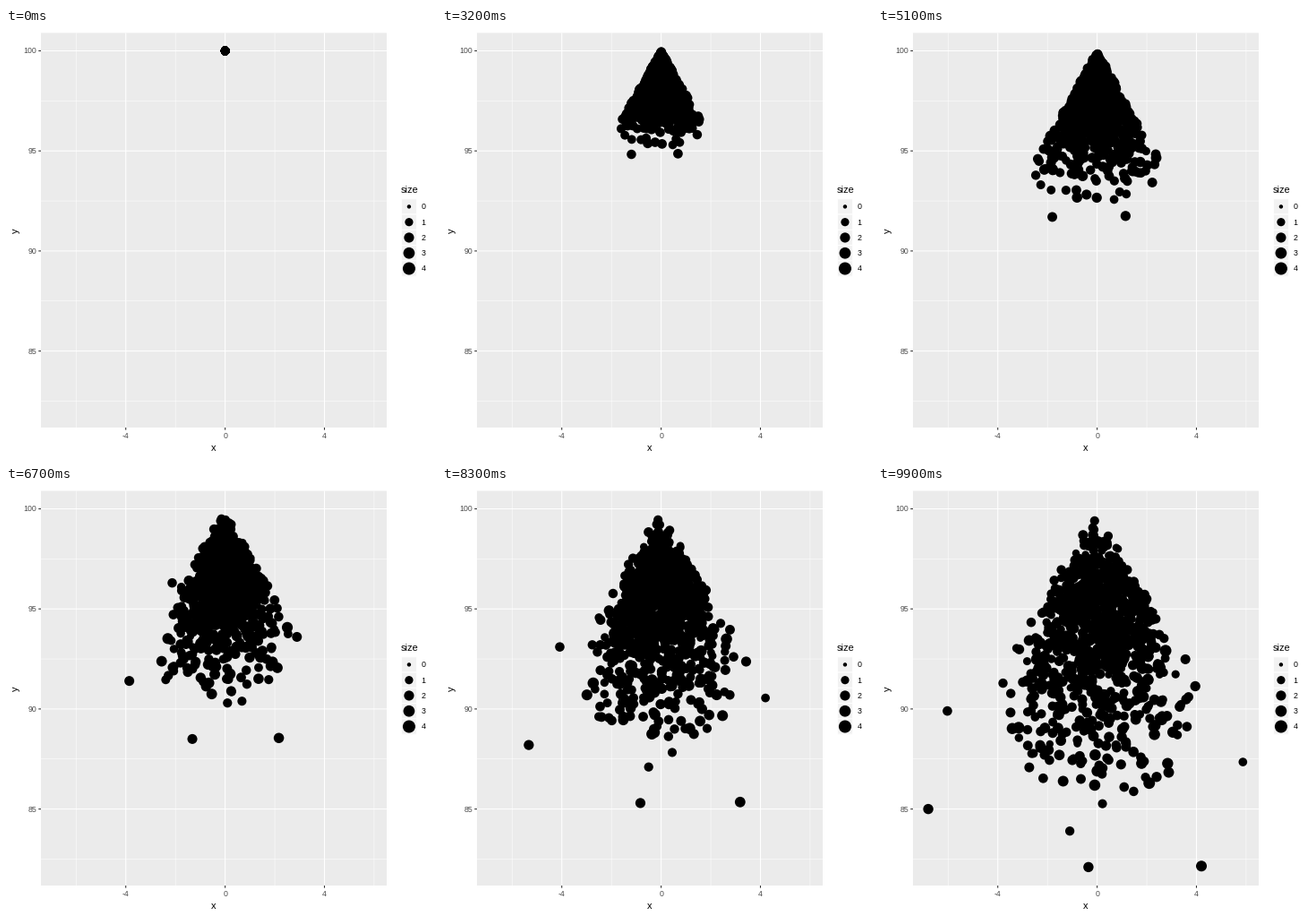
Write a matplotlib script that moves like this. It is 480 by 480 pixels and loops after 10000 ms.

```python
import numpy as np
import matplotlib.pyplot as plt
from matplotlib.animation import FuncAnimation
from matplotlib.patches import Circle, Rectangle

W = H = 480
DPI = 100
PT = 72 / DPI
FRAMES = 100
MID, END = 49.5, 99
FULL_DROP = 9.9

plt.rcParams["font.family"] = "Liberation Sans"
fig = plt.figure(figsize=(W / DPI, H / DPI), dpi=DPI, facecolor="white")
ax = fig.add_axes([0, 0, 1, 1])
ax.set_xlim(0, W)
ax.set_ylim(H, 0)
ax.axis("off")


def px(x):
    return 244.6 + 27.72 * np.asarray(x)


def py(y):
    return 25.5 + 22.34 * (100 - np.asarray(y))


def rect(x, y, w, h, color, edge="none"):
    ax.add_patch(Rectangle((x, y), w, h, fc=color, ec=edge, lw=PT,
                           zorder=0, snap=False))


def line(x0, y0, x1, y1, color="white", width=1.07):
    ax.plot([x0, x1], [y0, y1], color=color, lw=width * PT,
            solid_capstyle="butt", zorder=1, snap=False)


def label(x, y, s, size=8.8, color="#4D4D4D", **kw):
    ax.text(x, y, s, fontsize=size * PT, color=color, **kw)


# Panel, grid and axes
L, T, R, B = 39, 5.5, 425, 446
rect(L, T, R - L, B - T, "#EBEBEB")
for v in range(-6, 7, 4):
    line(px(v), T, px(v), B, width=0.53)
for v in np.arange(82.5, 100, 5):
    line(L, py(v), R, py(v), width=0.53)
for v in range(-4, 5, 4):
    line(px(v), T, px(v), B)
    line(px(v), B, px(v), B + 2.7, "#333333")
    label(px(v), 458, str(v), ha="center")
for v in range(85, 101, 5):
    line(L, py(v), R, py(v))
    line(L - 2.7, py(v), L, py(v), "#333333")
    label(34, py(v) + 2.9, str(v), ha="right")
label(232, 472, "x", 11, "black", ha="center")
label(16, 226, "y", 11, "black", ha="right", va="center", rotation=90)

# Legend: dot area grows with size
label(441, 184, "size", 11, "black")
for i in range(5):
    cy = 199.4 + 17.28 * i
    rect(441.3, cy - 8.64, 17.28, 17.28, "#F2F2F2", "white")
    ax.add_patch(Circle((449.9, cy), 2.2 + 2.4 * np.sqrt(i), fc="black", lw=0))
    label(463.5, cy + 2.9, str(i), color="black")


def cloud(n, rng):
    """Two downward steps per particle, with related lengths, inside a cone.

    Columns: halfway x and depth, final x and depth.
    """
    m = 4 * n
    a = rng.normal(size=(2, m))
    b = 0.6 * a + 0.8 * rng.normal(size=(2, m))
    r1, r2 = 2.35 * np.hypot(*a), 3.1 * np.hypot(*b)
    t1 = rng.uniform(-0.43, 0.43, m)
    t2 = rng.uniform(-0.5, 0.5, m)
    x1, d1 = r1 * np.sin(t1), r1 * np.cos(t1)
    x2, d2 = x1 + r2 * np.sin(t2), d1 + r2 * np.cos(t2)
    low = np.maximum(d2 - 8, 0) / 7
    ok = ((d1 < 8.8) & (r2 < FULL_DROP) & (d2 > 0.55)
          & (np.abs(x2) < 0.46 * d2 + 0.1)
          & ((x2 / 4.3) ** 2 + low ** 2 < 1))
    return np.column_stack([x1, d1, x2, d2])[ok][:n]


# Fastest fallers: halfway x and depth, final x; all drop equally afterwards
fast = np.array([(1.05, 7.95, 4.2), (-1.85, 8.0, -0.35), (-2.25, 5.1, -6.8),
                 (0, 0.2, -6.03), (0.71, 2.75, 5.87), (0.75, 6.2, -1.1)])
fast = np.column_stack([fast, fast[:, 1] + FULL_DROP])

rng = np.random.default_rng(12)
x1, d1, x2, d2 = np.vstack([cloud(940, rng), fast]).T
size = np.clip(rng.normal(10.3, 1, len(x1)) + 0.12 * (d2 - 6), 7.5, 13)

start = np.column_stack([0 * x1, 100 + 0 * x1, 9.8 + 0 * x1])
half = np.column_stack([x1, 100 - d1, 9.9 + 0.6 * (size - 9.8)])
final = np.column_stack([x2, 100 - d2, size])
cone = ax.scatter(px(start[:, 0]), py(start[:, 1]), s=(start[:, 2] * PT) ** 2,
                  c="black", linewidths=0, zorder=3)


def update(i):
    if i < MID:
        state = start + (half - start) * (i / MID)
    else:
        state = half + (final - half) * ((i - MID) / (END - MID))
    x, y, d = state.T
    cone.set_offsets(np.column_stack([px(x), py(y)]))
    cone.set_sizes((d * PT) ** 2)
    return (cone,)


anim = FuncAnimation(fig, update, frames=FRAMES, interval=100,
                     repeat=True, repeat_delay=0, blit=False)
plt.show()
```
